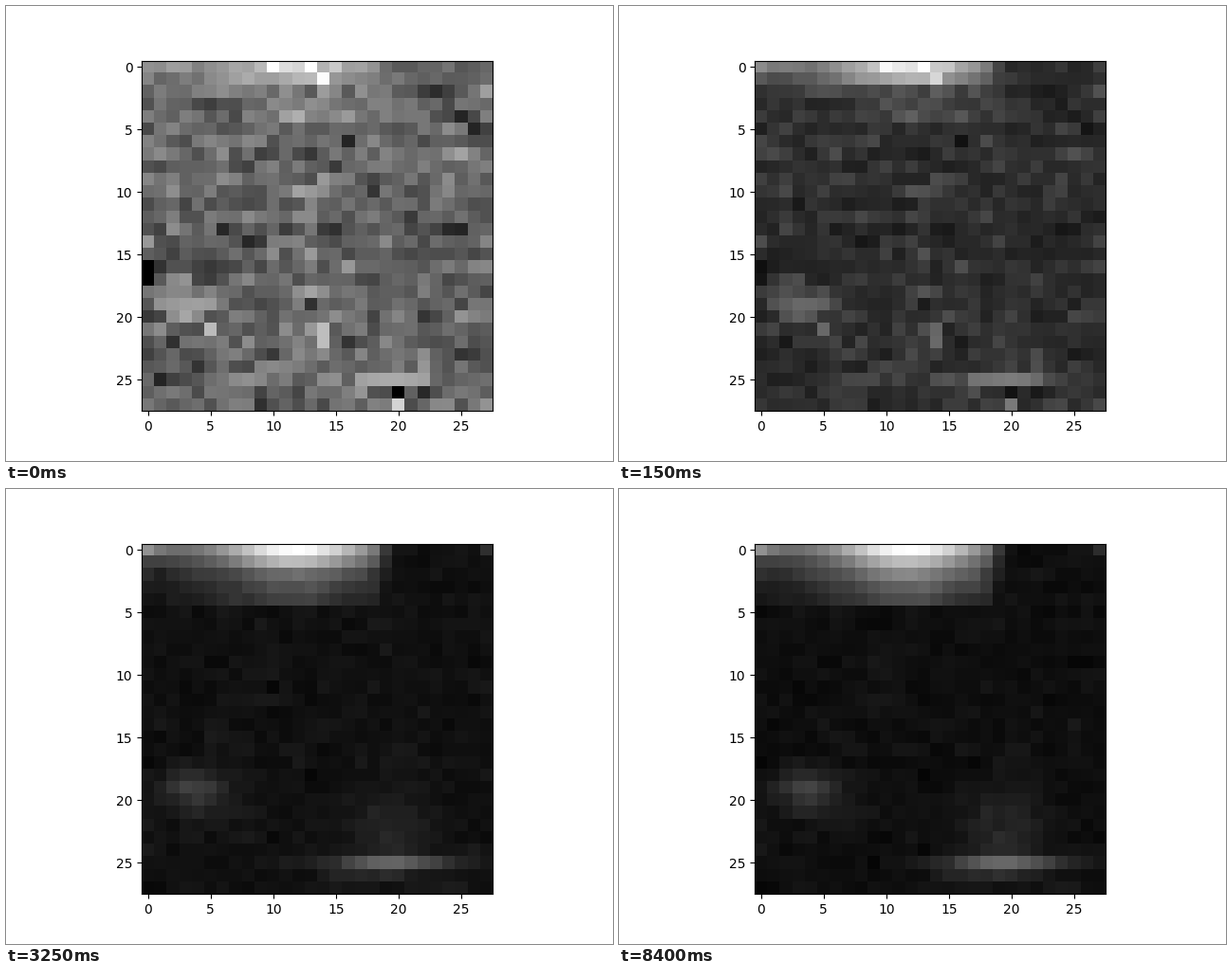
Animation, 640 px wide and 480 px high, one loop 10000 ms. Source, as a matplotlib script:

```python
import numpy as np
import matplotlib.pyplot as plt
from matplotlib.animation import FuncAnimation

N = 28
STEP = 50
FRAMES = 200
FLOOR = 15
rows, cols = np.mgrid[0:N, 0:N]
rng = np.random.default_rng(4)


def blob(row, col, height, width, level):
    """Soft spot of light centred on a cell."""
    return level * np.exp(-((rows - row) / height) ** 2 - ((cols - col) / width) ** 2)


def speckle(spread):
    """Grain with a slight pull along each row."""
    n = rng.normal(0, 1, (N, N))
    return spread * np.clip(0.9 * n + 0.35 * np.roll(n, 1, axis=1), -2.6, 2.6)


# Light falling from the top edge, cut off on the right, with brighter corners.
arch = 0.28 + 0.72 * np.exp(-((cols - 11.7) / 6) ** 2)
cutoff = 1 / (1 + np.exp((cols - 19) / 0.4))
corners = (70 * np.exp(-cols / 2) + 45 * np.exp(cols - N + 1)) * np.exp(-2 * rows)
glow = np.where(rows < 5, 255 * np.exp(-0.3 * rows) * arch * cutoff + corners - FLOOR, 0)
glow = np.maximum(glow, 0)

smudge = blob(19.3, 3.8, 1.8, 2.6, 48)
bar = blob(25, 19.5, 0.6, 4.8, 72)
haze = blob(22.5, 19.5, 3.5, 3, 26) + blob(26, 18, 0.9, 4, 18)

# The opening grain, with the marks that stand out: row, column, length, change.
early = speckle(24)
early[:2] *= 0.5
for r, c, n, change in [(0, 10, 1, 60), (0, 13, 1, 60), (1, 14, 1, 85),
                        (16, 0, 1, -100), (17, 0, 1, -100), (19, 1, 5, 40),
                        (21, 5, 1, 80), (21, 14, 1, 90), (22, 14, 1, 90),
                        (25, 17, 6, 35), (26, 20, 1, -110), (27, 20, 1, 110)]:
    early[r, c:c + n] = change

# Fainter grain; each cell jumps to its final level at its own moment.
middle = speckle(10)
final = speckle(4)
settle = rng.exponential(3000, (N, N))
for grain in (middle, final):
    grain[:2, :20] *= 0.4


def picture(t):
    quick = 1 - 0.45 * np.exp(-t / 180) - 0.12 * np.exp(-t / 2500)
    late = 1 - 0.8 * np.exp(-t / 3000)
    base = FLOOR + 6 * np.exp(-t / 2500) + 79 * np.exp(-t / 110)
    light = (glow * np.where(rows < 2, quick, late)
             + (smudge + bar) * quick + haze * late)

    # Dark specks vanish sooner than bright ones.
    fade = np.exp(-t / np.where(early < 0, 120, 300))
    rise = 1 - np.exp(-t / 300)
    grain = np.where(t < settle, middle * np.exp(-t / 3500), final) * rise
    return np.clip(base + light + early * fade + grain, 0, 255)


fig, ax = plt.subplots(figsize=(6.4, 4.8), dpi=100)
view = ax.imshow(picture(0), cmap="gray")


def draw(i):
    img = picture(i * STEP)
    view.set_data(img)
    view.set_clim(0, img.max())
    return [view]


anim = FuncAnimation(fig, draw, frames=FRAMES, interval=STEP, repeat=True, repeat_delay=0)
plt.show()
```
